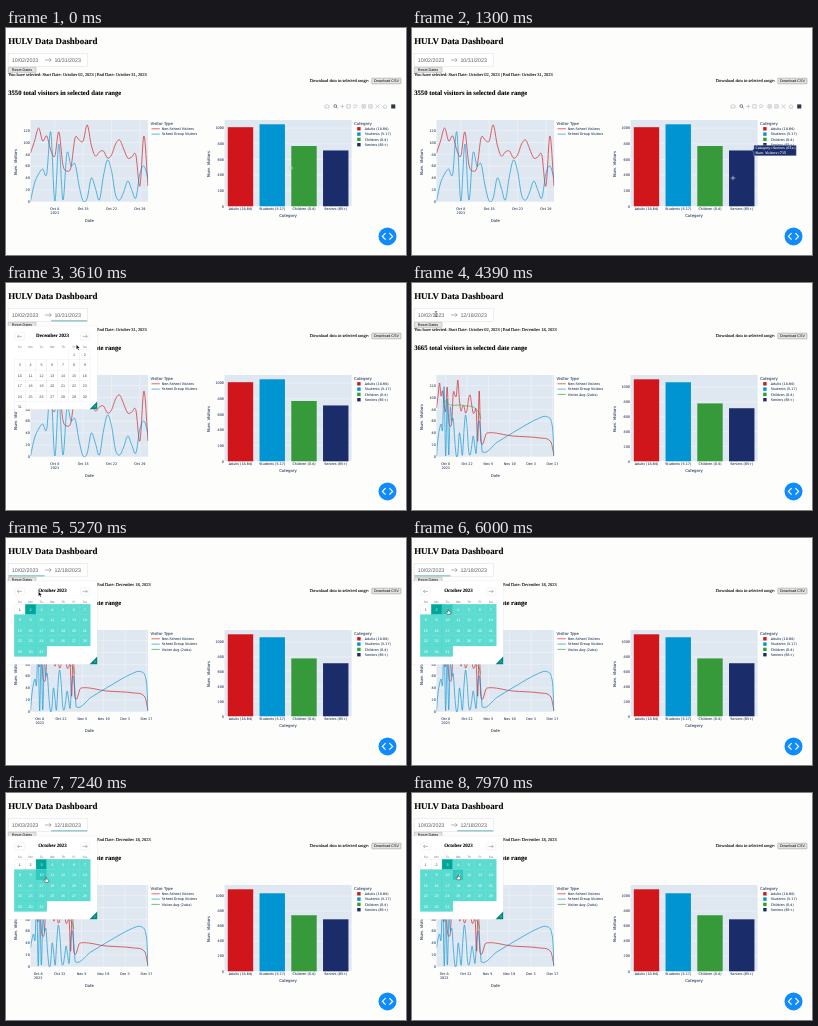
Write an HTML page that moves like this. It is 400 by 227 pixels and loops after 8000 ms.

```html
<!DOCTYPE html>
<html lang="en">
<head>
<meta charset="utf-8">
<title>Data Dashboard</title>
<style>
html, body { margin: 0; width: 100%; height: 100%; overflow: hidden; background: #fdfdfc; }
svg { display: block; width: 100vw; height: 100vh; }
text { text-rendering: geometricPrecision; white-space: pre; }
.serif { font-family: "Liberation Serif", serif; stroke: #000; stroke-width: .08; }
.sans { font-family: "Liberation Sans", sans-serif; }
.plot { font-family: "DejaVu Sans", sans-serif; fill: #2a3f5f; stroke: #2a3f5f; stroke-width: .06; }
.plot.light { fill: #fff; stroke: #fff; }
.bold { font-weight: 700; }
</style>
</head>
<body>
<svg viewBox="0 0 400 227">
  <defs>
    <clipPath id="plotClip"><rect x="24.5" y="92" width="117.8" height="82"/></clipPath>
  </defs>
  <g id="scene"></g>
  <g id="cursor"></g>
</svg>
<script>
const LOOP = 8000;
const RED = '#d0161b', BLUE = '#0094d2', GREEN = '#369a3a', NAVY = '#1a2c69';
const PLOT_BG = '#dfe7f1';
const BAR_COLORS = [RED, BLUE, GREEN, NAVY];
const GROUPS = ['Adults (18-64)', 'Students (5-17)', 'Children (0-4)', 'Seniors (65+)'];

const RANGES = [
  { start: 2, end: '10/31/2023', endText: 'October 31, 2023', days: 29, counts: [1013, 1050, 772, 715],
    ticks: [[6, 'Oct 8'], [13, 'Oct 15'], [20, 'Oct 22'], [27, 'Oct 29']] },
  { start: 2, end: '12/18/2023', endText: 'December 18, 2023', days: 77, counts: [1105, 1065, 780, 715] },
  { start: 3, end: '12/18/2023', endText: 'December 18, 2023', days: 76, counts: [1090, 1037, 745, 691] }
];
const LONG_TICKS = [[6, 'Oct 8'], [20, 'Oct 22'], [34, 'Nov 5'], [48, 'Nov 19'], [62, 'Dec 3'], [76, 'Dec 17']];

// Heights of the daily lines on the stage, one per day from October 2.
const RED_DAYS = [125, 113, 100, 113, 108, 122, 128, 104, 137, 143, 139, 110, 112, 113, 97,
  117, 128, 124, 123, 130, 127, 116, 112, 121, 130, 129, 127, 158, 108, 158];
const BLUE_DAYS = [173, 155, 146, 141, 146, 104, 173, 116, 172, 125, 138, 136, 158, 173, 170,
  150, 160, 172, 148, 132, 143, 167, 172, 164, 153, 162, 170, 146, 138, 150];
const RED_TAIL = [[33, 150], [50, 153], [68, 155], [75, 159], [77, 173]];
const BLUE_TAIL = [[30, 169], [40, 159], [53, 147], [66, 136], [73, 134], [76, 144], [77, 173]];
const AVERAGE = [[5, 117], [9, 122], [15, 122], [20, 123], [24, 124], [28, 130], [29, 136]];

const MONTHS = [
  { name: 'October 2023', first: 0, length: 31 },
  { name: 'November 2023', first: 3, length: 30 },
  { name: 'December 2023', first: 5, length: 31 }
];
const CELL_W = 10.85, CELL_H = 10.45, CELL_X = 8.3, CELL_Y = 66.2;

// time, x, y of the pointer's hot spot
const PATH = [[0, 285, 140], [350, 290, 141], [800, 304, 144], [1300, 321, 150], [1700, 321, 150],
  [2050, 215, 122], [2350, 95, 88], [2610, 30, 61.5], [2920, 60, 32], [3030, 60, 32],
  [3220, 79, 53], [3540, 79, 53], [3820, 25, 107], [3960, 25, 107], [4390, 24, 31], [4620, 24, 31],
  [5270, 32.5, 53.5], [5700, 33, 58], [5950, 36, 71], [6150, 36, 71], [6640, 36.5, 86.4],
  [7300, 40, 84], [7970, 46, 81.5], [8000, 46, 81.5]];

const rect = (x, y, w, h, fill, extra = '') =>
  `<rect x="${x}" y="${y}" width="${w}" height="${h}" fill="${fill}" ${extra}/>`;
const label = (x, y, size, str, cls, extra = '') =>
  `<text x="${x}" y="${y}" font-size="${size}" class="${cls}" ${extra}>${str}</text>`;
const line = (d, color, width, extra = '') =>
  `<path d="${d}" fill="none" stroke="${color}" stroke-width="${width}" ${extra}/>`;
const MIDDLE = 'text-anchor="middle"', END = 'text-anchor="end"';
const sideTitle = (x, y, str) =>
  label(0, 0, 3.89, str, 'plot', `${MIDDLE} transform="translate(${x} ${y}) rotate(-90)"`);

function spline(points) {
  const at = i => points[Math.max(0, Math.min(points.length - 1, i))];
  const slope = (p, q) => (q[1] - p[1]) / (q[0] - p[0]);
  let d = `M${points[0]}`;
  for (let i = 0; i < points.length - 1; i++) {
    const [a, b, c, e] = [at(i - 1), at(i), at(i + 1), at(i + 2)];
    const reach = (c[0] - b[0]) / 3;
    d += `C${b[0] + reach} ${b[1] + slope(a, c) * reach} ${c[0] - reach} ${c[1] - slope(b, e) * reach} ${c}`;
  }
  return d;
}

function header(range) {
  const total = range.counts.reduce((a, b) => a + b);
  return label(2.2, 16.3, 8.89, 'HULV Data Dashboard', 'serif bold') +
    rect(2.2, 39.1, 27.8, 5.3, '#e4e4e4', 'rx=".6" stroke="#888" stroke-width=".35"') +
    label(16, 43.1, 3.7, 'Reset Dates', 'sans', MIDDLE) +
    label(2.2, 48.4, 4.44, `You have selected: Start Date: October 0${range.start}, 2023 | End Date: ${range.endText}`, 'serif') +
    label(303.8, 53.6, 4.44, 'Download data in selected range:', 'serif') +
    rect(365.8, 50.2, 29.2, 5.6, '#e4e4e4', 'rx=".6" stroke="#777" stroke-width=".4"') +
    label(380.4, 54.3, 3.7, 'Download CSV', 'sans', MIDDLE) +
    label(2.2, 67.3, 6.67, `${total} total visitors in selected date range`, 'serif bold');
}

function dateField(start, end, focus) {
  const value = (x, str) => label(x, 33.7, 5.3, str, 'sans', 'fill="#5c5c5c"');
  const underline = focus ? rect(focus === 'start' ? 2.5 : 45.2, 37.6, 36, .6, '#008489') : '';
  return rect(2.1, 25.2, 79.5, 13, '#fff', 'stroke="#d4d6d6" stroke-width=".4"') +
    value(5.8, `10/0${start}/2023`) + value(48.4, end) +
    line('M39 32H45.2M43.3 30.1L45.2 32L43.3 33.9', '#666', .5) + underline;
}

function modebar(side) {
  const icons = [
    [321, 'M-2 -1H-1L-.5 -1.7H.6L1 -1H2V1.6H-2Z'],
    [329.7, 'M1.8 2L.6 .7M1 -.4A1.4 1.4 0 1 1 -1.8 -.4A1.4 1.4 0 1 1 1 -.4'],
    [336.3, 'M-2 0H2M0 -2V2'],
    [342.5, 'M-1.7 -1.7H1.7V1.7H-1.7Z'],
    [349, 'M-1.8 0Q-1.8 -1.6 .3 -1.6T1.9 0T-1 1L-1.4 2'],
    [357.7, 'M-1.7 -1.7H1.7V1.7H-1.7ZM-1 0H1M0 -1V1'],
    [364.5, 'M-1.7 -1.7H1.7V1.7H-1.7ZM-1 0H1'],
    [371.5, 'M-2 -2L2 2M2 -2L-2 2'],
    [379, 'M-2 .2L0 -1.8L2 .2M-1.4 0V1.8H1.4V0']
  ];
  // The line chart has no select and lasso buttons, so its bar is shorter.
  const left = side === 'left';
  return icons.map(([x, d], i) => {
    if (left && (i === 3 || i === 4)) return '';
    const shift = left ? (i < 3 ? -181.5 : -194.5) : 0;
    return `<g transform="translate(${x + shift} 78.4)">` +
      line(d, i === 1 ? '#59687f' : '#a9b1bd', i === 1 ? .8 : .6) + '</g>';
  }).join('') + rect(385.2 - (left ? 194.5 : 0), 76.4, 4.1, 4.1, '#2c3849');
}

function lineChart(range) {
  const long = range.days > 30, skip = range.start - 2, step = 117.5 / range.days;
  const toX = day => 24.5 + (day - skip) * step;
  let out = rect(24.5, 92, 117.6, 82, PLOT_BG);
  for (let v = 0; v <= 120; v += 20) {
    const y = 173.7 - v * .592;
    out += line(`M24.5 ${y}H142.1`, '#fff', .35) + label(23.8, y + 1.2, 3.33, v, 'plot', END);
  }
  for (const [day, name] of range.ticks || LONG_TICKS) {
    out += line(`M${toX(day)} 92V174`, '#fff', .35) + label(toX(day), 181.6, 3.33, name, 'plot', MIDDLE);
  }
  out += label(toX(6), 185.8, 3.33, '2023', 'plot', MIDDLE);
  const curve = (days, tail, color) => {
    const pts = days.map((y, i) => [i, y]).concat(long ? tail : []);
    return line(spline(pts.slice(skip).map(([d, y]) => [toX(d), y])), color, .65);
  };
  out += '<g clip-path="url(#plotClip)">' + curve(RED_DAYS, RED_TAIL, RED) + curve(BLUE_DAYS, BLUE_TAIL, BLUE);
  if (long) out += line(spline(AVERAGE.map(([d, y]) => [toX(d), y])), GREEN, .55);
  out += '</g>' + label(83.3, 193.6, 3.89, 'Date', 'plot', MIDDLE) + sideTitle(10.6, 134, 'Num. Visitors') +
    label(144.6, 97.3, 3.89, 'Visitor Type', 'plot');
  const entries = [['Non-School Visitors', RED], ['School Group Visitors', BLUE]];
  if (long) entries.push(['Visitor Avg (2wks)', GREEN]);
  entries.forEach(([name, color], i) => {
    const y = 100.8 + i * 5.3;
    out += line(`M145.5 ${y}H153.8`, color, .65) + label(155.7, y + 1.2, 3.33, name, 'plot');
  });
  return out;
}

const BASELINE = 178.3;
const barX = i => 221.8 + i * 31.75;
const barScale = counts => 82 / Math.max(...counts);

function barChart({ counts }) {
  const scale = barScale(counts);
  let out = rect(218.6, 92, 127, 86.3, PLOT_BG);
  for (let v = 0; v <= 1000; v += 200) {
    const y = BASELINE - v * scale;
    out += line(`M218.6 ${y}H345.6`, '#fff', .35) + label(217.9, y + 1.2, 3.33, v, 'plot', END);
  }
  counts.forEach((n, i) => {
    const y = 100.8 + i * 5.3;
    out += rect(barX(i), BASELINE - n * scale, 25.4, n * scale, BAR_COLORS[i]) +
      label(barX(i) + 12.7, 182.3, 3.33, GROUPS[i], 'plot', MIDDLE) +
      rect(351.2, y - 1.7, 3.4, 3.4, BAR_COLORS[i]) + label(358.8, y + 1.2, 3.33, GROUPS[i], 'plot');
  });
  return out + label(282, 189.4, 3.89, 'Category', 'plot', MIDDLE) + sideTitle(204.2, 136, 'Num. Visitors') +
    label(348, 97.3, 3.89, 'Category', 'plot');
}

function tooltip(i, { counts }) {
  const x = barX(i) + 24, y = BASELINE - counts[i] * barScale(counts);
  const put = (dy, str) => label(x + 2.4, y + dy, 3.25, str, 'plot light');
  return line(`M${x - 1.2} ${y}L${x + .8} ${y - 1.4}V${y - 5.3}H${x + 43.3}V${y + 5.4}H${x + .8}V${y + 1.4}Z`,
    '#fff', .3, `style="fill:${BAR_COLORS[i]}"`) + put(-1, `Category=${GROUPS[i]}`) + put(3.8, `Num. Visitors=${counts[i]}`);
}

function calendar(month, start, lastOctober, hover) {
  const { name, first, length } = MONTHS[month];
  const nav = (x, d) => rect(x, 49.7, 9.4, 7.4, '#fff', 'rx=".8" stroke="#dfe2e2" stroke-width=".35"') + line(d, '#82888a', .55);
  let out = rect(0, 43, 91.2, 83.2, '#fff', 'stroke="#dcdfe0" stroke-width=".25"') +
    nav(9, 'M16 53.4H11.4M13 51.8L11.4 53.4L13 55') + nav(74.4, 'M76.7 53.4H81.3M79.7 51.8L81.3 53.4L79.7 55') +
    label(46.5, 53.9, 5, name, 'serif bold', MIDDLE);
  ['Su', 'Mo', 'Tu', 'We', 'Th', 'Fr', 'Sa'].forEach((d, i) => {
    out += label(CELL_X + CELL_W * (i + .5), 64.6, 3.2, d, 'sans', `${MIDDLE} fill="#757575"`);
  });
  for (let day = 1; day <= length; day++) {
    const slot = day - 1 + first;
    const x = CELL_X + slot % 7 * CELL_W, y = CELL_Y + Math.floor(slot / 7) * CELL_H;
    const inRange = month === 0 && day >= start;
    const edge = month === 0 && (day === start || day === lastOctober);
    let fill = edge ? '#00a699' : inRange ? '#5cdcd1' : '#fff';
    if (slot === hover && !edge) fill = inRange ? '#2fcabd' : '#e4e7e7';
    out += rect(x, y, CELL_W, CELL_H, fill, `stroke="${inRange ? '#48d3c7' : '#e4e7e7'}" stroke-width=".28"`) +
      label(x + CELL_W / 2, y + 6.5, 3.7, day, 'sans', `${MIDDLE} fill="${inRange ? '#fff' : '#484848'}"`);
  }
  return out + '<path d="M91.2 118.6V126.2H83.6Z" fill="#00877d"/>' +
    label(88.9, 125.2, 3.2, '?', 'sans', `${MIDDLE} fill="#fff"`);
}

const debugButton = '<circle cx="381.5" cy="208.4" r="9" fill="#108bfb"/>' +
  line('M379.6 205.2L376.4 208.4L379.6 211.6M383.4 205.2L386.6 208.4L383.4 211.6', '#fff', 1.2);

const cursors = {
  cross: line('M-2.3 0H2.3M0 -2.3V2.3', '#c9d1e0', .7),
  beam: line('M-1.2 -2.6Q0 -2.6 0 -1.8V1.8Q0 2.6 -1.2 2.6M1.2 -2.6Q0 -2.6 0 -1.8M0 1.8Q0 2.6 1.2 2.6', '#222', .55),
  arrow: '<path d="M0 0V4.7L1.1 3.7L1.9 5.5L2.7 5.1L1.9 3.4H3.4Z" fill="#000" stroke="#fff" stroke-width=".3"/>',
  hand: '<path d="M-.5 .2Q0 -.4 .5 .2V2L2.3 2.5Q2.9 2.7 2.8 3.4L2.3 5.3H-.6L-2 3.4Q-2 2.6 -1.2 2.9L-.5 3.4Z" fill="#fff" stroke="#222" stroke-width=".45"/>'
};

function pointerAt(t) {
  const i = Math.max(1, PATH.findIndex(p => p[0] > t));
  const [a, b] = [PATH[i - 1], PATH[i]];
  const u = (t - a[0]) / (b[0] - a[0]), e = u * u * (3 - 2 * u);
  return [a[1] + (b[1] - a[1]) * e, a[2] + (b[2] - a[2]) * e];
}

const within = (x, y, l, t, r, b) => x >= l && x <= r && y >= t && y <= b;

function stateAt(t) {
  const [x, y] = pointerAt(t);
  const open = t >= 2980 && t < 3920 || t >= 4560;
  const picked = t < 3900 ? 0 : t < 6040 ? 1 : 2;
  const shown = t < 4020 ? 0 : t < 6240 ? 1 : 2;
  const month = t >= 3500 && t < 4000 ? 2 : t >= 3300 && t < 4000 ? 1 : 0;
  const onDays = open && within(x, y, CELL_X, CELL_Y, CELL_X + 7 * CELL_W - .1, 118.4);
  const hover = onDays ? Math.floor((y - CELL_Y) / CELL_H) * 7 + Math.floor((x - CELL_X) / CELL_W) : -1;
  const onNav = open && (within(x, y, 74, 49, 84, 57) || within(x, y, 9, 49, 18, 57));
  const onPlot = !open && (within(x, y, 24.5, 92, 142, 174) || within(x, y, 218.6, 92, 345.6, 178));
  const kind = onDays || onNav ? 'hand' : within(x, y, 2, 25, 82, 38) ? 'beam' : onPlot ? 'cross' : 'arrow';
  const tip = t < 1760 && x > 317 ? 3 : t < 1760 && x > 286 && x < 310.5 ? 2 : -1;
  const bar = t < 2020 ? 'right' : t < 2720 ? 'left' : '';
  const focus = !open ? '' : t >= 4560 && t < 6040 ? 'start' : 'end';
  return { x, y, kind, look: { open, picked, shown, month, hover, tip, bar, focus } };
}

function drawScene({ open, picked, shown, month, hover, tip, bar, focus }) {
  const range = RANGES[shown], dates = RANGES[picked];
  return header(range) + dateField(dates.start, dates.end, focus) +
    lineChart(range) + barChart(range) + (bar ? modebar(bar) : '') +
    (tip >= 0 ? tooltip(tip, range) : '') + debugButton +
    (open ? calendar(month, dates.start, picked ? 0 : 31, hover) : '');
}

const scene = document.getElementById('scene'), cursor = document.getElementById('cursor');
let lastLook = '', lastKind = '';

function frame(now) {
  const { x, y, kind, look } = stateAt(now % LOOP);
  const key = JSON.stringify(look);
  if (key !== lastLook) scene.innerHTML = drawScene(look);
  if (kind !== lastKind) cursor.innerHTML = cursors[kind];
  lastLook = key;
  lastKind = kind;
  cursor.setAttribute('transform', `translate(${x} ${y})`);
  requestAnimationFrame(frame);
}
frame(performance.now());
</script>
</body>
</html>
```
